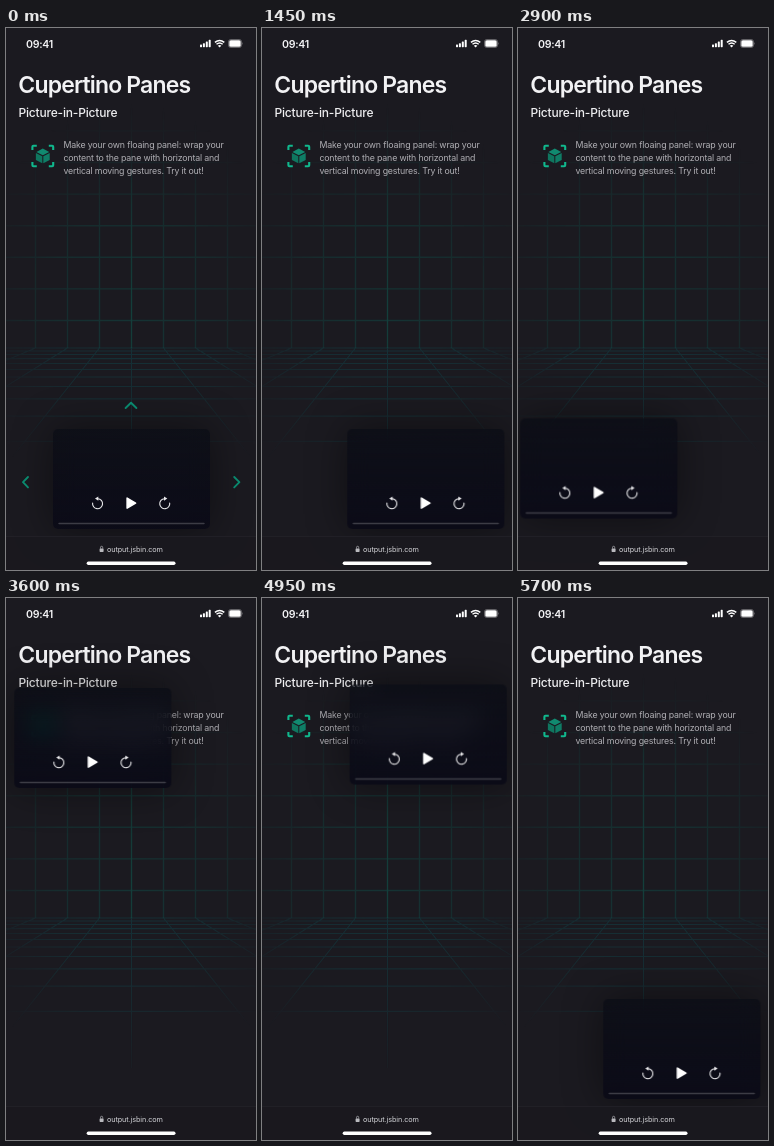
Recreate the animation shown at these times as an HTML page. Size 250 px wide and 542 px high, loop 5800 ms.

```html
<!DOCTYPE html>
<html lang="en">
<head>
<meta charset="utf-8">
<title>Floating pane</title>
<style>
  html, body { margin: 0; width: 100%; height: 100%; overflow: hidden; background: #1b1a20; }
  #stage { position: relative; width: 250px; height: 542px; overflow: hidden; background: #1b1a20; }
  svg { position: absolute; left: 0; top: 0; display: block; }
  text { font-family: Inter, "Liberation Sans", sans-serif; fill: #fff; }
  .title { font-size: 23px; font-weight: 600; letter-spacing: -.85px; fill: #f2f2f4; }
  .sub { font-size: 12px; font-weight: 500; letter-spacing: -.18px; fill: #eeeef0; }
  .copy { font-size: 8.8px; letter-spacing: -.17px; fill: #b0afb4; }
  .clock { font-size: 10.6px; font-weight: 600; letter-spacing: -.3px; fill: #f4f4f6; }
  .url { font-size: 7.3px; letter-spacing: -.1px; fill: #d2d2d6; }
  #pane {
    position: absolute; left: 0; top: 0; width: 157px; height: 100px; border-radius: 5px;
    background: linear-gradient(rgba(6, 9, 17, .6), rgba(9, 9, 22, .84));
    -webkit-backdrop-filter: blur(11px) saturate(1.5); backdrop-filter: blur(11px) saturate(1.5);
    box-shadow: 0 0 40px rgba(0, 0, 0, .45);
  }
</style>
</head>
<body>
<div id="stage">
  <svg width="250" height="542" viewBox="0 0 250 542">
    <defs>
      <radialGradient id="fade" gradientUnits="userSpaceOnUse" cx="0" cy="0" r="1"
        gradientTransform="translate(125 285) scale(165 210)">
        <stop offset="0" stop-color="#fff"/>
        <stop offset=".5" stop-color="#aaa"/>
        <stop offset="1" stop-color="#000"/>
      </radialGradient>
      <mask id="glow" maskUnits="userSpaceOnUse" x="0" y="0" width="250" height="542">
        <rect width="250" height="542" fill="url(#fade)"/>
      </mask>
    </defs>
    <g mask="url(#glow)" fill="none">
      <path id="wall" stroke="#0b6c60" stroke-opacity=".33" stroke-width="1.4"/>
      <path id="floor" stroke="#0c6268" stroke-opacity=".36" stroke-width="1.1"/>
      <path d="M125.5 150V320" stroke="#0b8a74" stroke-opacity=".12" stroke-width="1.4"/>
    </g>

    <text class="title" x="12.3" y="65">Cupertino Panes</text>
    <text class="sub" x="12.4" y="88.5">Picture-in-Picture</text>
    <text class="copy" x="57.4" y="120">Make your own floaing panel: wrap your</text>
    <text class="copy" x="57.4" y="132.8">content to the pane with horizontal and</text>
    <text class="copy" x="57.4" y="145.6">vertical moving gestures. Try it out!</text>

    <g transform="translate(36.8 128)">
      <path d="M-10.4-6V-9.2Q-10.4-10.2-9.4-10.2H-6M6-10.2H9.4Q10.4-10.2 10.4-9.2V-6M10.4 6V9.2Q10.4 10.2 9.4 10.2H6M-6 10.2H-9.4Q-10.4 10.2-10.4 9.2V6"
        fill="none" stroke="#10b88d" stroke-width="2.1"/>
      <path d="M0-7.4L6.4-4L0-.7L-6.4-4Z" fill="#118a70"/>
      <path d="M-6.9-3L-.5.3V7.3L-6.9 3.9Z" fill="#0f765f"/>
      <path d="M6.9-3L.5.3V7.3L6.9 3.9Z" fill="#0f7d66"/>
    </g>

    <g id="arrows" fill="none" stroke="#0b8f73" stroke-width="1.9" stroke-linecap="round" stroke-linejoin="round">
      <path id="left" d="M22 449L17 454.2L22 459.4"/>
      <path id="right" d="M228.2 449L233.4 454.2L228.2 459.4"/>
      <path id="up" d="M119.6 380L125 374.8L130.4 380"/>
    </g>
  </svg>

  <div id="pane">
    <svg width="157" height="100" viewBox="0 0 157 100">
      <g id="back" transform="translate(44.6 74.6)">
        <path d="M-5-.6A5 5 0 1 0 .3-4.9" fill="none" stroke="#e8e8ea" stroke-width="1.1" stroke-linecap="round"/>
        <path d="M-2.6-5L.7-7.2V-2.8Z" fill="#e8e8ea"/>
      </g>
      <use href="#back" transform="translate(156.3 0) scale(-1 1)"/>
      <path d="M74.1 69.1L82.6 74.1L74.1 79.1Z" fill="#fff" stroke="#fff" stroke-width="1.5" stroke-linejoin="round"/>
      <rect x="5.3" y="93.8" width="146.4" height="1.5" rx=".75" fill="#fff" fill-opacity=".2"/>
    </svg>
  </div>

  <svg width="250" height="542" viewBox="0 0 250 542">
    <text class="clock" x="20" y="19.8">09:41</text>
    <g fill="#fff">
      <rect x="194" y="16.6" width="2" height="2.6" rx=".6"/>
      <rect x="196.9" y="15.2" width="2" height="4" rx=".6"/>
      <rect x="199.8" y="13.5" width="2" height="5.7" rx=".6"/>
      <rect x="202.7" y="11.8" width="2" height="7.4" rx=".6"/>
      <path d="M213.6 19.4L211.9 17.7Q213.6 16.4 215.3 17.7Z"/>
      <rect x="223.3" y="12.3" width="11.4" height="6.4" rx="1.5"/>
      <path d="M236.2 14.1Q237.2 15.5 236.2 16.9Z" opacity=".5"/>
    </g>
    <rect x="222.5" y="11.5" width="13" height="8" rx="2.3" fill="none" stroke="#fff" stroke-opacity=".4" stroke-width=".8"/>
    <path d="M208.9 14.4Q213.6 10.4 218.3 14.4M210.5 16.3Q213.6 13.6 216.7 16.3" fill="none" stroke="#fff" stroke-width="1.4"/>

    <rect y="508.5" width="250" height="33.5" fill="#1a191f" fill-opacity=".85"/>
    <rect y="508" width="250" height=".8" fill="#232228"/>
    <rect x="93.6" y="520.4" width="4" height="3.5" rx=".6" fill="#b9b9be"/>
    <path d="M94.5 520.6V519.4A1.1 1.1 0 0 1 96.7 519.4V520.6" fill="none" stroke="#b9b9be" stroke-width=".7"/>
    <text class="url" x="100.9" y="523.8">output.jsbin.com</text>
    <rect x="80.7" y="533.6" width="88.8" height="3.3" rx="1.65" fill="#fff"/>
  </svg>
</div>

<script>
const LOOP = 5800, STEP = 50;
const $ = id => document.getElementById(id);
const clamp = v => Math.max(0, Math.min(1, v));
const linear = p => p;
const easeIn = p => Math.pow(p, 1.6);
const easeOut = p => 1 - Math.pow(1 - p, 3);

// Perspective grid: back wall squares plus a floor spreading from the horizon.
function drawGrid() {
  const mid = 125.5, cell = 32, horizon = 320, depth = 40, end = 470;
  let wall = "", floor = "";
  for (let i = -3; i <= 3; i++) {
    const x = mid + i * cell;
    const spread = 1 + (end - horizon) / depth;
    wall += `M${x} 70V${horizon}`;
    floor += `M${x} ${horizon}L${mid + i * cell * spread} ${end}`;
  }
  for (let y = 292.5; y > 60; y -= 31.6) wall += `M0 ${y}H250`;
  for (let n = 0; n < 11; n++) {
    const y = horizon + depth * (1 / (1 - .07 * n) - 1);
    floor += `M0 ${y}H250`;
  }
  $("wall").setAttribute("d", wall);
  $("floor").setAttribute("d", floor);
}

// time, x, y, easing used to arrive there
const path = [
  [0, 47, 401, linear],
  [1050, 47, 401, linear],
  [1200, 66, 401, easeIn],
  [1450, 85.3, 401, easeOut],
  [2000, 85.3, 401, linear],
  [2200, 46, 404, easeIn],
  [2450, 8.3, 401, easeOut],
  [2850, 8.3, 401, linear],
  [2900, 2.3, 390.5, linear],
  [2980, 4, 290, easeIn],
  [3200, 8.3, 90, easeOut],
  [3950, 8.3, 90, linear],
  [4080, 38, 88, easeIn],
  [4200, 78.5, 88, linear],
  [4400, 85.3, 90, easeOut],
  [4700, 85.3, 90, linear],
  [4950, 87.7, 86.5, easeOut],
  [5150, 85.3, 90, easeOut],
  [5250, 85.3, 90, linear],
  [5420, 85.3, 210, easeIn],
  [5700, 85.3, 401, easeOut],
  [LOOP, 85.3, 401, linear]
];

function paneAt(t) {
  const i = path.findIndex(k => k[0] > t);
  const [t0, x0, y0] = path[i - 1], [t1, x1, y1, ease] = path[i];
  const p = ease((t - t0) / (t1 - t0));
  return [x0 + (x1 - x0) * p, y0 + (y1 - y0) * p];
}

const shift = (id, x, y) => $(id).setAttribute("transform", `translate(${x} ${y})`);

function render(time) {
  const t = Math.floor(time % LOOP / STEP) * STEP;
  const [x, y] = paneAt(t);
  $("pane").style.transform = `translate(${x}px, ${y}px)`;

  const p = clamp((t - 50) / 900);
  const hint = 7.5 * (1 - (1 - p) * (1 - p));
  shift("left", hint, 0);
  shift("right", -hint, 0);
  shift("up", 0, hint * .85);
  $("arrows").setAttribute("opacity", 1 - clamp((t - 1050) / 250));
}

function tick() {
  render(performance.now());
  requestAnimationFrame(tick);
}

drawGrid();
tick();
</script>
</body>
</html>
```
